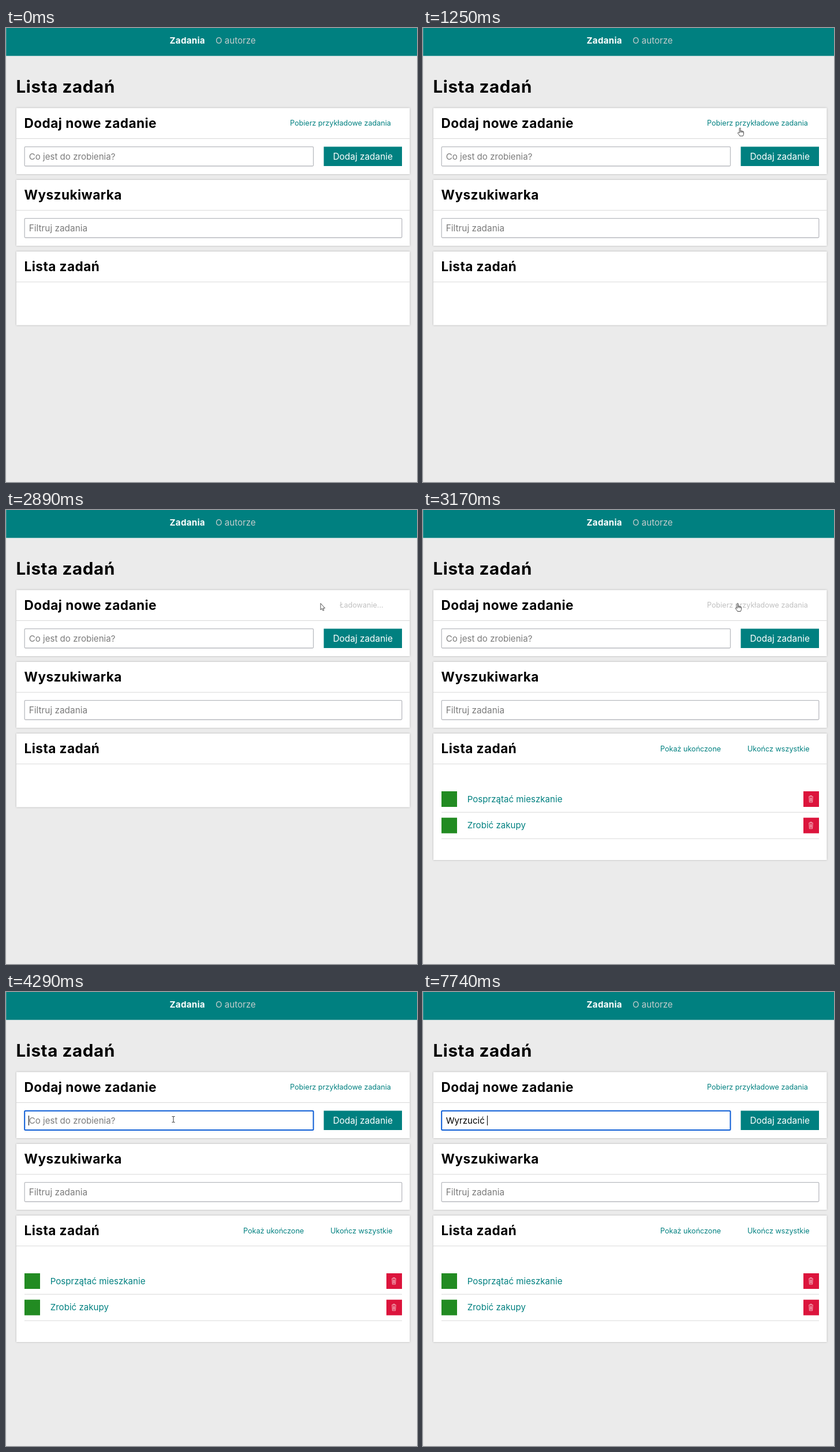
An HTML page that plays this animation: 712x786 px, repeating every 8000 ms.

```html
<!DOCTYPE html>
<html lang="pl">
<head>
<meta charset="utf-8">
<title>Lista zadań</title>
<style>
  html, body { margin: 0; width: 100%; height: 100%; overflow: hidden; background: #ebebeb; }
  svg { display: block; width: 100%; height: 100%; font: 15.1px Inter, "Open Sans", sans-serif; }
  .h1, .h2, .active { font-weight: 700; letter-spacing: .02em; }
  .h1 { font-size: 29.6px; }
  .h2 { font-size: 22.6px; }
  .link { font-size: 12.6px; fill: teal; }
  .card { fill: #fff; filter: drop-shadow(0 0 1.5px #0004); }
  .rule { stroke: #d9d9d9; }
  .field { fill: #fff; stroke: #b9bbc0; stroke-width: 1.3; }
  .hint { fill: #7b7b7b; }
  #typed { white-space: pre; }
  .pointer { fill: #fff; stroke: #3a3a3a; stroke-width: .9; stroke-linejoin: round; stroke-linecap: round; }
</style>
</head>
<body>
<svg viewBox="0 0 712 786">
  <defs>
    <g id="row">
      <rect x="32" width="27" height="27" fill="forestgreen"/>
      <rect x="659" width="27" height="27" fill="crimson"/>
      <path d="M668.2 9.2h7.6M670.5 9v-1.4h3V9M668.8 9.5l.6 9.5h5.2l.6-9.5M670.8 11v6.5M672 11v6.5M673.2 11v6.5" fill="none" stroke="#f8cdd5" stroke-width=".8"/>
      <path class="rule" d="M32 36.3H686"/>
    </g>
  </defs>

  <rect width="712" height="786" fill="#ebebeb"/>
  <rect width="712" height="48.3" fill="teal"/>
  <rect width="1" height="786" fill="#ccd4d4" opacity=".3"/>
  <text class="active" x="283.5" y="27">
    <tspan fill="#fff">Zadania</tspan>
  </text>
  <text x="363" y="27" fill="#c4cccc">O autorze</text>
  <text class="h1" x="17.5" y="112">Lista zadań</text>

  <rect class="card" x="18" y="138.5" width="681.5" height="114.5"/>
  <path class="rule" d="M18 191.5H699.5"/>
  <text class="h2" x="31.5" y="172.5">Dodaj nowe zadanie</text>
  <text class="link" id="fetch" x="492" y="168.7"></text>
  <rect class="field" id="taskField" x="32.2" y="205.7" width="500.3" height="33.3" rx="1.5"/>
  <text class="hint" id="hint" x="39.7" y="228">Co jest do zrobienia?</text>
  <text id="typed" x="39.7" y="228"></text>
  <rect id="caret" y="214" width="1" height="17"/>
  <rect x="550.5" y="205.5" width="135.5" height="33.5" fill="teal"/>
  <text x="566.5" y="228" font-size="15.4" fill="#fff">Dodaj zadanie</text>

  <rect class="card" x="18" y="263" width="681.5" height="114"/>
  <path class="rule" d="M18 315.7H699.5"/>
  <text class="h2" x="31.5" y="297">Wyszukiwarka</text>
  <rect class="field" x="32.2" y="329.7" width="653.6" height="33.3" rx="1.5"/>
  <text class="hint" x="39.7" y="352" font-size="15.4">Filtruj zadania</text>

  <rect class="card" id="listCard" x="18" y="387" width="681.5" height="127.5"/>
  <path class="rule" d="M18 439.7H699.5"/>
  <text class="h2" x="31.5" y="421">Lista zadań</text>
  <g id="tasks">
    <text class="link" x="411" y="417.5">Pokaż ukończone</text>
    <text class="link" x="562" y="417.5">Ukończ wszystkie</text>
    <use href="#row" y="487"/>
    <text x="76.7" y="505.5" fill="teal">Posprzątać mieszkanie</text>
    <use href="#row" y="532.7"/>
    <text x="76.7" y="551.2" fill="teal">Zrobić zakupy</text>
  </g>

  <g id="cursor">
    <path class="pointer" id="arrow" d="M0 .5V11.3L2.4 9 4.1 12.8 5.8 12 4.2 8.5H7.2Z"/>
    <path class="pointer" id="hand" d="M-.9 8.5V1Q-.9 0 .1 0T1.1 1V5.2Q2.2 4.5 3 5.5 4.3 4.9 4.9 6 6.5 5.6 6.5 7.3V10Q6.5 11.6 5.2 14H-.2Q-1.2 11.6-3.6 9.3-4 8-2.7 7.8ZM1.1 5.2V7.6M3 5.5V7.8M4.9 6V8"/>
    <path id="beam" fill="none" stroke="#333" d="M-2.5-5.5H-.8L0-5 .8-5.5H2.5M0-5V4M-2.5 4.5H-.8L0 4 .8 4.5H2.5"/>
  </g>
</svg>
<script>
const LOOP = 8000;
const APPEAR = 500, CLICK = 2120, DISABLED = 2890, LOADED = 3170, FOCUS = 4220;
const $ = id => document.getElementById(id);
const show = (id, on) => $(id).style.display = on ? "" : "none";

// [start, end, x, y]: the pointer arrives at x, y at the end time
const moves = [
  [500, 1250, 549, 173],
  [1340, 1700, 547, 167],
  [1900, 2610, 545, 161.5],
  [3380, 4150, 290, 221]
];
const keys = [[5010, "W"], [5800, "y"], [6000, "r"], [6280, "z"], [6480, "u"],
              [6680, "c"], [6880, "i"], [7340, "ć"], [7740, " "]];

const TEAL = [0, 128, 128], HOVER = [0, 142, 142], SILVER = [192, 192, 192];
const clamp = v => Math.max(0, Math.min(1, v));
const mix = (a, b, k) => a + (b - a) * k;
const ease = k => k * k * (3 - 2 * k);
const fade = (from, to, k) => `rgb(${from.map((v, i) => mix(v, to[i], clamp(k)))})`;

function pointerAt(t) {
  let x = 663, y = 751;
  for (const [start, end, toX, toY] of moves) {
    const k = ease(clamp((t - start) / (end - start)));
    x = mix(x, toX, k);
    y = mix(y, toY, k);
  }
  return [x, y];
}

function pointerShape(t, x, y) {
  const inside = (l, top, r, b) => x > l && x < r && y > top && y < b;
  if (inside(32, 205, 533, 240) || inside(32, 329, 686, 364)) return "beam";
  const onLink = inside(478, 150, 682, 179) && !(t >= DISABLED && t < LOADED);
  return onLink || inside(550, 205, 686, 239) ? "hand" : "arrow";
}

function linkColor(t) {
  if (t < CLICK) return fade(TEAL, HOVER, (t - 1300) / 400);
  if (t < LOADED) return fade(HOVER, SILVER, (t - CLICK) / 500);
  return fade(SILVER, TEAL, (t - LOADED) / 500);
}

function draw(t) {
  const loading = t >= CLICK && t < LOADED;
  $("fetch").textContent = loading ? "Ładowanie..." : "Pobierz przykładowe zadania";
  $("fetch").setAttribute("x", loading ? 578 : 492);
  $("fetch").style.fill = linkColor(t);

  show("tasks", t >= LOADED);
  $("listCard").setAttribute("height", t >= LOADED ? 219 : 127.5);

  const focused = t >= FOCUS;
  $("taskField").style.stroke = focused ? "#0b5cd5" : "";
  $("taskField").style.strokeWidth = focused ? 2 : "";

  const pressed = keys.filter(([time]) => t >= time);
  $("typed").textContent = pressed.map(key => key[1]).join("");
  show("hint", !pressed.length);

  const lastInput = pressed.length ? pressed[pressed.length - 1][0] : 4280;
  show("caret", focused && (t - lastInput) % 1060 < 530);
  const textWidth = pressed.length ? $("typed").getComputedTextLength() : 0;
  $("caret").setAttribute("x", Math.round(39.1 + textWidth));

  const [x, y] = pointerAt(t);
  const shape = pointerShape(t, x, y);
  show("cursor", t >= APPEAR && !pressed.length);
  $("cursor").setAttribute("transform", `translate(${x} ${y})`);
  for (const id of ["arrow", "hand", "beam"]) show(id, id === shape);
}

const began = performance.now();
function tick() {
  draw((performance.now() - began) % LOOP);
  requestAnimationFrame(tick);
}
tick();
</script>
</body>
</html>
```
